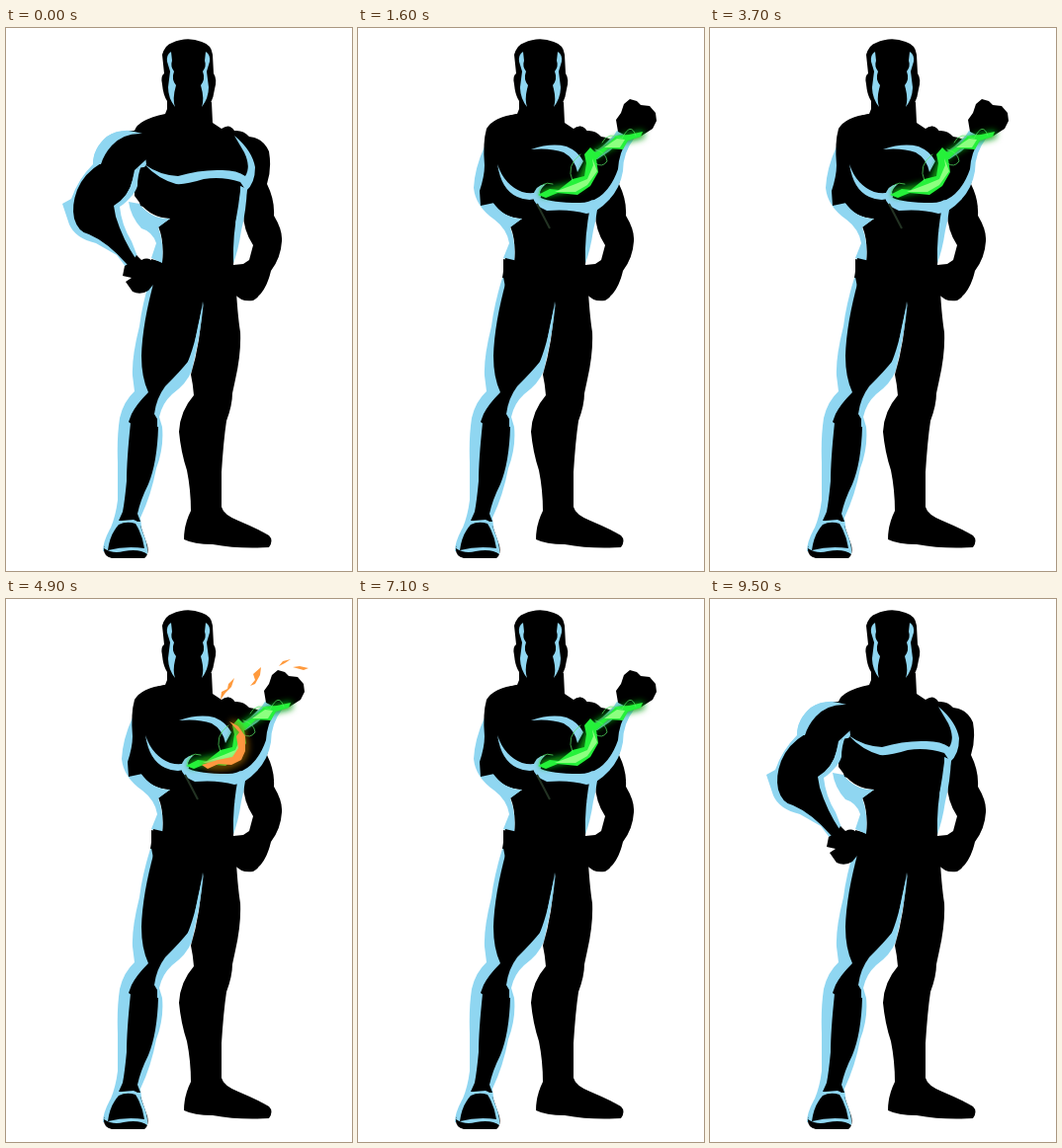
An HTML page that plays this animation: 350 by 550 pixels, repeating every 9600 ms.

```html
<!DOCTYPE html>
<html lang="en">
<head>
<meta charset="utf-8">
<title>Hero power-up</title>
<style>
  html, body { margin: 0; width: 100%; height: 100%; overflow: hidden; background: #fff; }
  svg { display: block; width: 350px; height: 550px; }
  .b { fill: #8fd6f1; }
  .glow { filter: url(#blur); }
  .line { fill: none; stroke-linejoin: round; stroke-linecap: round; }
  [data-on] { visibility: hidden; }
  [data-on].on { visibility: visible; }
</style>
</head>
<body>
<svg viewBox="0 0 350 550">
  <defs>
    <filter id="blur" x="-30%" y="-50%" width="160%" height="200%"><feGaussianBlur stdDeviation="3"/></filter>
  </defs>

  <!-- left leg -->
  <path class="b" d="M147 250Q138 278 135 302Q127 334 128 352L130 368Q119 378 115 395Q112 415 113 440L113 478Q111 494 106 506Q98 520 98 530L140 530L136 496Q147 473 152 446Q160 425 158 404L155 394Q158 380 168 371Q183 360 188 347L202 275Z"/>
  <path d="M151 252Q138 298 137 332Q137 354 144 369Q132 381 127 391L124 399L128 402L153 405L153 396L150 391Q152 375 161 363Q176 348 184 338Q193 316 199 277L205 250Z"/>
  <path d="M126 400Q122 438 122 459Q120 480 118 490L114 499L136 500L133 492Q136 478 144 462Q153 440 154 404Z"/>
  <path d="M99 526Q98 535 107 537L140 537Q145 533 143 524L136 504L114 502Z"/>
  <path class="b" d="M110 502Q102 513 99 527Q108 533 119 530Q135 527 143 533Q144 524 138 510Q135 499 129 498L117 499Z"/>
  <path d="M114 503Q122 499 131 502Q138 513 140 527Q122 524 103 529Q105 513 114 503Z"/>

  <!-- right leg -->
  <path d="M199 276Q197 318 187 351Q189 360 190 372Q176 388 175 409Q177 430 183 448Q187 468 187 489Q180 503 180 518Q190 523 209 523Q236 528 266 526Q271 519 266 514Q254 507 235 499Q220 493 218 485L218 450Q220 418 223 398Q229 382 229 370L232 356Q238 330 237 308Q234 290 232 250L190 246Z"/>
  <path class="b" d="M200 277Q193 304 190 325Q184 345 163 362Q157 369 154 383Q162 372 174 365Q187 353 191 333Q197 307 200 277Z"/>

  <!-- torso and right arm -->
  <path d="M163 82L208 75L209 96L218 102Q226 96 231 104Q240 103 246 110Q260 111 266 125Q269 143 264 158Q272 174 271 190Q280 205 279 216Q278 233 268 246Q263 268 250 276Q238 278 231 269L232 266L150 268L147 252L147 234L158 237Q160 215 154 201L166 193Q147 192 136 178L130 170L130 104Q133 93 161 87Z"/>
  <path fill="#fff" d="M240 187Q240 205 250 220L246 235L240 239L230 240Q231 213 240 187Z"/>
  <path class="b" d="M235 180Q229 211 230 238L229 241Q235 226 238 205Q243 186 244 160L237 165Z"/>

  <!-- head -->
  <path d="M163 83L163 74Q159 68 158 57Q156 49 160 46L158 27Q161 17 168 15Q183 8 198 14Q208 17 209 27L210 46Q214 52 211 62Q210 70 207 76L208 100L163 98Z"/>
  <path class="b" id="cheek" d="M167 24Q162 27 163 34L166 44L164 60Q164 71 171 80Q168 72 172 58Q167 52 170 44Q166 39 168 33Z"/>
  <use href="#cheek" transform="matrix(-1 0 0 1 369 0)"/>

  <!-- hands on hips -->
  <g data-on="I">
    <path class="b" d="M138 106Q116 100 102 110Q88 122 88 138Q73 153 66 173L57 178L64 199Q70 213 91 218L112 230L122 243L134 234L127 216Q117 200 115 181Q130 172 134 151L142 138Z"/>
    <path d="M142 103Q120 103 108 112Q98 123 96 137Q79 147 72 164Q66 180 69 193Q73 207 84 209Q103 217 123 240L132 235Q118 214 111 191L109 180Q124 171 128 154L130 144L142 133Z"/>
    <path d="M120 241Q128 237 132 230L137 235Q145 231 149 238L152 256L144 266Q136 271 128 267L121 257L127 253L118 251Z"/>
    <path class="b" d="M138 107Q119 106 107 119Q99 128 96 138L88 138Q88 122 102 110Q117 101 138 107Z"/>
    <path class="b" d="M124 176Q126 191 137 203Q148 206 152 218L147 233L158 238Q160 217 154 202L166 193Q147 194 135 178Z"/>
    <path d="M133 142L145 140L158 188L136 180L132 165Z"/>
    <path class="b" d="M137 139Q133 149 133 160Q129 173 112 180Q125 168 128 154Q130 143 137 139Z"/>
    <path class="b" d="M140 138Q155 149 174 150Q197 143 219 144Q234 144 242 150Q248 141 241 126L231 109Q249 124 252 141Q252 157 243 165L237 156Q219 150 200 153Q181 159 172 158Q154 153 140 138Z"/>
    <path class="b" d="M237 160L244 163L239 193L232 198Q238 178 237 160Z"/>
  </g>

  <!-- flexed arm -->
  <g data-on="ABC">
    <path class="b" d="M128 120Q118 142 117 162Q119 181 138 194Q151 204 153 218L147 233L158 238Q160 217 154 202L166 193Q148 193 136 176Z"/>
    <path d="M161 87Q137 90 130 102Q126 116 128 139Q128 150 123 165L124 180L138 177Q145 191 166 193L180 120Z"/>
    <path d="M149 233L170 238L170 254L146 253Z"/>
    <path d="M218 107L220 101Q226 98 230 102L233 106Q241 104 246 115L235 124Z"/>
    <path class="b" d="M262 104L280 111Q268 126 268 145Q265 163 253 175Q242 187 231 188Q214 183 191 185Q178 180 177 171Q179 159 190 158Q181 166 185 172Q196 177 223 177Q242 178 253 158Q260 149 262 129L250 122Z"/>
    <path d="M264 112L273 113Q264 126 263 143Q255 166 239 174Q216 178 190 172L224 137L243 130Z"/>
    <path class="b" d="M141 138Q148 159 166 166Q177 169 184 165L185 171Q174 177 161 171Q145 164 141 138Z"/>
    <path class="b" d="M175 123Q195 116 211 120Q223 125 228 135L222 146Q219 132 208 126Q194 121 175 123Z"/>
    <path class="b" d="M263 105L247 120L231 131L242 133L254 125L269 112Z"/>
    <path d="M263 105L261 93L266 86L269 77L275 72L282 74L286 78L295 79L301 86L302 94L298 102L287 109L277 112Z"/>
  </g>

  <!-- green energy -->
  <g data-on="AB">
    <path d="M181 178L194 203" stroke="#233323" stroke-width="2"/>
    <path class="glow line" stroke="#0a9d18" stroke-width="8" d="M188 167L225 159L236 131L251 121L268 112L286 108"/>
    <path fill="#25f13a" d="M182 169L194 163L203 164L217 153L229 150L231 137L229 128L235 121L240 126L252 119L261 109L274 108L288 105L286 110L273 114L268 123L253 122L241 133L243 146L235 160L222 169L202 167L190 172Z"/>
    <path fill="#8dff80" d="M199 166L220 158L232 153L238 139L237 132L242 145L232 159L220 166ZM249 121L262 112L270 113L265 121Z"/>
    <path class="line" stroke="#57ee66" stroke-width=".7" d="M183 168Q184 154 197 158M217 155Q210 139 225 128M240 123Q251 126 252 135Q247 142 240 137M247 116Q253 104 267 112M267 112Q276 94 281 109"/>
  </g>

  <!-- orange flames -->
  <g data-on="BC">
    <path class="glow line" stroke="#a66b00" stroke-width="7" opacity=".7" d="M230 126Q249 144 238 162Q222 174 203 168"/>
    <path fill="#ff963f" d="M226 124L235 129L242 139L242 154L238 163L228 168L215 167L204 172L198 168L214 163L229 160L235 151L233 139L236 135Z"/>
    <path fill="#ff9a3d" d="M217 102L218 94L224 91L225 86L231 80L228 89L222 95ZM247 88L252 82L250 76L258 69L257 77L252 86ZM276 68L280 63L288 61L282 65ZM290 69L297 68L306 70L301 72Z"/>
  </g>

  <!-- yellow lightning -->
  <g data-on="C">
    <path class="glow line" stroke="#8fc800" stroke-width="5" opacity=".5" d="M163 152L184 170L225 179L268 166L279 150L298 134L296 122L283 112L269 96"/>
    <path class="line" stroke="#cdff25" stroke-width="2.2" d="M162 150L169 160L177 157L184 172L193 167L201 175L210 170L217 179L225 173L232 182L240 174L249 178L256 168L264 172L270 160L277 152"/>
    <path class="line" stroke="#d4ff2a" stroke-width="1" d="M164 160L176 165L185 154L193 174L207 160L223 179L239 178L254 166L269 151L264 140M278 118L291 122L301 131L289 143L272 150L264 162"/>
    <path fill="#cdff1c" d="M267 91L273 100L281 101L278 107L284 114L293 119L299 122L297 129L301 138L296 133L292 123L281 120L273 111ZM299 136L287 138L280 146L270 148L278 150L287 142Z"/>
  </g>
</svg>
<script>
  // I: idle, A: green, B: green and orange, C: yellow and orange
  const poses = "IBCIBCABCABCBABCABCABABCABCIBCABIBCI";
  const brief = new Set([3, 27, 32, 33, 34, 35]);
  const ends = [];
  [...poses].reduce((t, _, i) => ends[i] = t + (brief.has(i) ? 100 : 300), 0);
  const loop = ends[ends.length - 1];
  const parts = document.querySelectorAll("[data-on]");

  const start = performance.now();
  function draw(now) {
    const t = Math.max(0, now - start) % loop;
    const pose = poses[ends.findIndex(end => t < end)];
    for (const p of parts) p.classList.toggle("on", p.dataset.on.includes(pose));
    requestAnimationFrame(draw);
  }
  draw(start);
</script>
</body>
</html>
```
